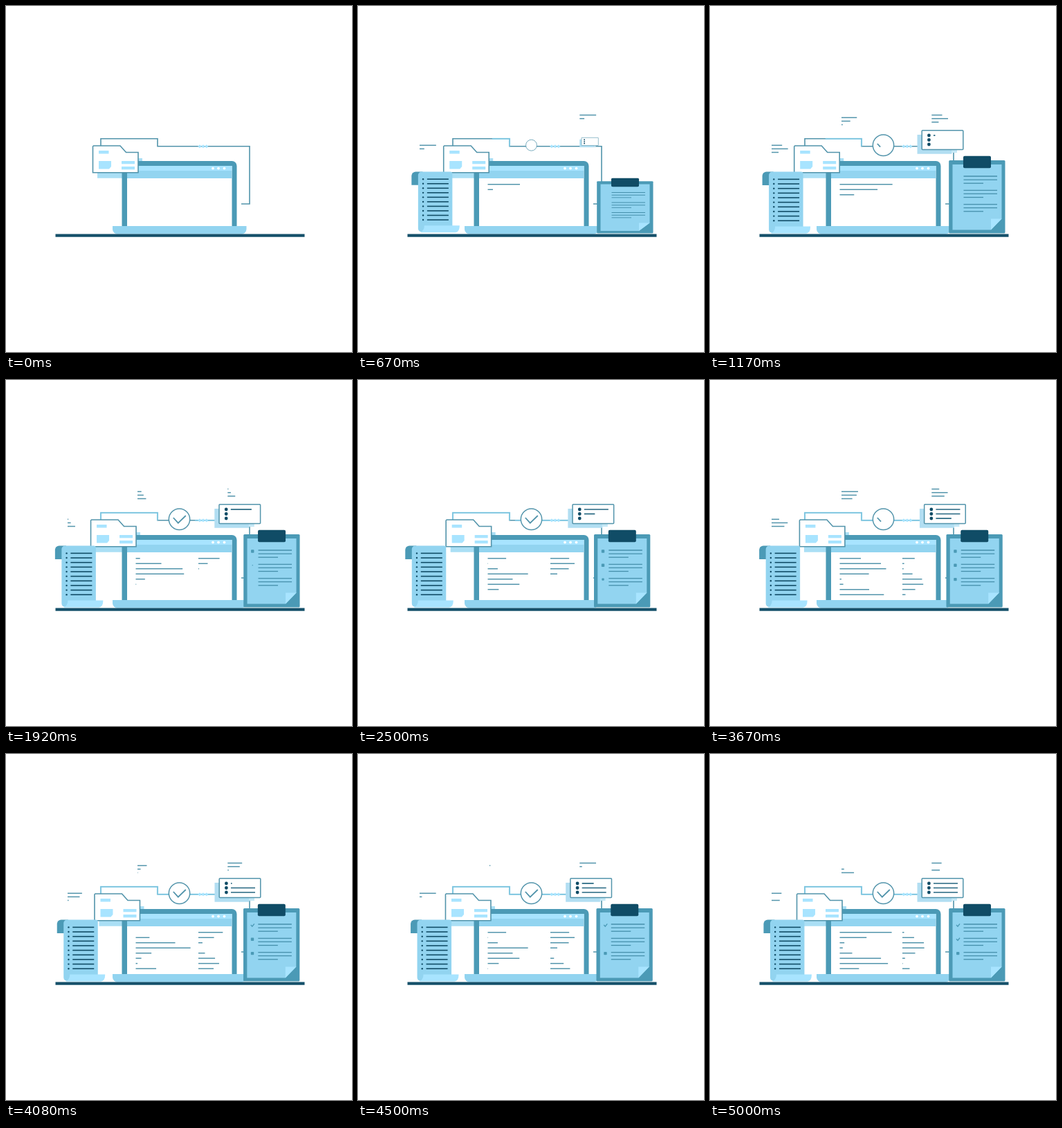
Write an HTML page with a canvas that moves like this. It is 500x500 px and loops after 5080 ms.

```html
<!DOCTYPE html>
<html lang="en">
<head>
<meta charset="utf-8">
<title>Documents workflow</title>
<style>
  html, body { margin: 0; width: 100%; height: 100%; overflow: hidden; background: #fff; }
  canvas { display: block; width: 500px; height: 500px; }
</style>
</head>
<body>
<canvas id="stage"></canvas>
<script>
const LOOP = 5080, STEP = 1000 / 12;
const STEEL = '#4b9ab6', NAVY = '#104c66', SKY = '#92d4f0', PALE = '#a8e4ff', EDGE = '#5294ab', GLOW = '#8ad3ee';

const canvas = document.getElementById('stage');
const ratio = window.devicePixelRatio || 1;
canvas.width = canvas.height = 500 * ratio;
const ctx = canvas.getContext('2d');

// Motion helpers, all times in seconds
const clamp = v => Math.min(1, Math.max(0, v));
const linear = (t, from, to) => clamp((t - from) / (to - from));
const wave = u => (1 - Math.cos(Math.PI * u)) / 2;
const ramp = (t, from, to) => wave(linear(t, from, to));
const bump = (t, from, peak, to) => ramp(t, from, peak) - ramp(t, peak, to);

// Drawing helpers
function rect(x, y, w, h, fill, radii = 0) {
  ctx.beginPath();
  ctx.roundRect(x, y, w, h, radii);
  ctx.fillStyle = fill;
  ctx.fill();
}

function trace(points) {
  ctx.beginPath();
  points.forEach(([x, y]) => ctx.lineTo(x, y));
}

function poly(points, fill) {
  trace(points);
  ctx.closePath();
  ctx.fillStyle = fill;
  ctx.fill();
}

function stroke(color, width) {
  ctx.strokeStyle = color;
  ctx.lineWidth = width;
  ctx.stroke();
}

// Strokes the first `len` pixels of a polyline
function partial(points, len, color, width) {
  if (len <= 0) return;
  ctx.setLineDash([len, 999]);
  trace(points);
  stroke(color, width);
  ctx.setLineDash([]);
}

function rule(x, y, w, color = EDGE, width = 1.5) {
  if (w < 0.4) return;
  trace([[x, y], [x + w, y]]);
  stroke(color, width);
}

function disc(x, y, r, fill) {
  ctx.beginPath();
  ctx.arc(x, y, r, 0, 2 * Math.PI);
  ctx.fillStyle = fill;
  ctx.fill();
}

// Draws a part shifted by dx and scaled about (ox, oy)
function placed(dx, ox, oy, sx, sy, draw) {
  if (sx < 0.01 || sy < 0.01) return;
  ctx.save();
  ctx.translate(ox + dx, oy);
  ctx.scale(sx, sy);
  ctx.translate(-ox, -oy);
  draw();
  ctx.restore();
}

const wire = [[340, 286], [352, 286], [352, 202.8], [219, 202.8], [219, 191.8], [137, 191.8], [137, 203]];

function drawWire(t) {
  trace(wire);
  stroke(EDGE, 1.6);
  ctx.globalAlpha = 0.75;
  partial(wire.slice(3), 103 * linear(t, 0, 1.9), GLOW, 2.2);
  partial([[312, 202.8], wire[3]], 93 * ramp(t, 1.2, 2.8), GLOW, 2.2);
  ctx.globalAlpha = 1;
  for (let x = 280; x < 292; x += 5) {
    poly([[x - 2.8, 202.8], [x, 200.2], [x + 2.2, 202.8], [x, 205.4]], PALE);
  }
}

// Each row starts a little later, then grows and shrinks every two seconds
function drawScreenText(t) {
  const row = (x, i, w, delay) => {
    if (t > delay) rule(x, 257.8 + 7.48 * i, w * wave(t - delay));
  };
  [77, 67, 70, 80, 36, 63, 77, 66].forEach((w, i) => {
    row(187.5, i, w, 0.1 + 0.35 * i);
    row(278, i, 36 - i, 1.17 + 0.32 * i);
  });
}

function drawLaptop(t) {
  rect(167.5, 224, 166, 95, STEEL, [7, 7, 0, 0]);
  rect(175, 231, 151.5, 88, '#fff');
  rect(175, 231, 151.5, 7, PALE);
  rect(175, 238, 151.5, 11, SKY);
  [299, 307, 315.5].forEach(x => disc(x, 234.6, 1.9, '#fff'));
  drawScreenText(t);
  rect(154, 318, 193.5, 11.5, SKY, [0, 0, 7, 7]);
}

function drawFolder() {
  poly([[125.5, 203], [126.5, 202], [165, 202], [173.5, 211.5], [191, 211.5], [191, 240.8], [125.5, 240.8]], '#fff');
  stroke(EDGE, 1.6);
  rect(134, 209, 14.5, 4.5, PALE);
  poly([[134, 224], [152, 224], [152, 232], [149, 235.5], [134, 235.5]], PALE);
  rect(167, 224, 19, 4.3, PALE);
  rect(167, 232, 19, 4.3, PALE);
}

function drawScroll() {
  rect(77.5, 239.5, 16, 19.5, STEEL, [6, 0, 0, 0]);
  rect(87, 239.5, 49.5, 88.5, SKY, [5, 3, 0, 5]);
  ctx.beginPath();
  ctx.moveTo(96, 318.5);
  ctx.lineTo(147, 318.5);
  ctx.quadraticCurveTo(147, 328, 141, 328.7);
  ctx.lineTo(90, 328.7);
  ctx.quadraticCurveTo(96, 326, 96, 318.5);
  ctx.fillStyle = PALE;
  ctx.fill();
  for (let i = 0; i < 10; i++) {
    const y = 250.4 + 6.65 * i;
    disc(94.2, y, 1.2, NAVY);
    rule(100, y, 31, NAVY, 1.6);
  }
}

function drawBadge(t) {
  disc(250.5, 201.2, 15.2, '#fff');
  stroke(EDGE, 1.5);
  const drawn = bump(t, 0.95, 1.6, 3.1) + ramp(t, 3.5, 3.95);
  const check = t < 3.1 ? ramp(t, 0.95, 1.6) : ramp(t, 3.5, 3.95);
  if (drawn > 0) partial([[241.8, 199], [248.8, 206.6], [259.8, 196]], 25.6 * check, EDGE, 1.8);
}

function drawCard(t) {
  rect(299.5, 186, 50, 27.8, '#b2def2');
  rect(349, 206, 8, 6, '#c5e8f6');
  rect(306.2, 179.8, 59.6, 27.6, '#fff', 1);
  stroke(EDGE, 1.5);
  for (let i = 0; i < 3; i++) {
    // Rows are typed in turn, each one again after all three are done
    const y = 187 + 6.5 * i, since = t - 1.1 - 0.98 * i;
    disc(316.4, y, 2.4, NAVY);
    rule(323, y, 35 * clamp(since % 2.94 / 0.95), '#23657f', 1.7);
  }
}

function drawClipboard(t) {
  rect(345.2, 223, 81.3, 105.5, STEEL, 1.5);
  poly([[350.5, 229], [421.5, 229], [421.5, 307.5], [406, 323.5], [350.5, 323.5]], SKY);
  poly([[406, 307.5], [421.5, 307.5], [406, 323.5]], PALE);
  rect(366, 216.8, 40, 17.4, NAVY, 2);
  for (let g = 0; g < 3; g++) {
    const y = 246 + 20.3 * g, bulletAt = 1.3 + 0.5 * g, checkAt = 3.8 + 0.7 * g;
    [48.5, 48.5, 28.5].forEach((w, i) => rule(366.5, y + 5.1 * i, w, '#458fab', 1.3));
    const size = 4.4 * ramp(t, bulletAt, bulletAt + 0.3);
    if (t < checkAt) rect(358.2 - size / 2, y + 1.5 - size / 2, size, size, STEEL, 0.8);
    else partial([[356, y + 1], [358, y + 3.2], [361, y - 0.6]], 8 * ramp(t, checkAt, checkAt + 0.3), STEEL, 1.4);
  }
}

// Three short lines swinging at different rates, mirrored in time around 2.5 s
function drawCaption(t, x, y, start, rate, spread) {
  for (let i = 0; i < 3; i++) {
    const swing = wave((t - 2.5) * (rate + spread * i) / 3.8) ** 2;
    const begin = start + 0.2 * i;
    rule(x, y + 5.1 * i, 24 * swing * ramp(t, begin, begin + 0.5));
  }
}

function draw(t) {
  ctx.setTransform(ratio, 0, 0, ratio, 0, 0);
  ctx.fillStyle = '#fff';
  ctx.fillRect(0, 0, 500, 500);

  const folderX = -4.3 * bump(t, 0, 1.5, 3.15) + 4.7 * bump(t, 1.5, 3.15, 5.08);
  const scrollX = -9.5 * bump(t, 0.5, 2.75, 5.1);
  const drift = bump(t, 1.1, 3, 5);
  const badge = bump(t, 0.45, 0.87, 3.1) && ramp(t, 0.45, 0.87) - ramp(t, 2.8, 3.1) + ramp(t, 3.2, 3.6);
  const badgeScale = t < 3.1 ? badge : ramp(t, 3.2, 3.6);
  const card = ramp(t, 0.3, 1.13);

  drawCaption(t, 89, 201.3, 0.1, 2, 1);
  drawCaption(t, 190, 161.3, 0.6, 3.2, 0.5);
  drawCaption(t, 320.3, 157.6, 0.1, 2, 1);
  drawWire(t);
  rect(132 + folderX, 220, 65, 28.7, '#aadff5');
  drawLaptop(t);
  placed(folderX, 0, 0, 1, 1, drawFolder);
  placed(scrollX, 112, 239.5, 1, ramp(t, 0.08, 0.72), drawScroll);
  placed(0, 250.5, 201.2, badgeScale, badgeScale, () => drawBadge(t));
  placed(4.6 * drift, 334.5, 197.5, card, card, () => drawCard(t));
  placed(-5 * drift, 386, 328.5, 1, ramp(t, 0.25, 0.9), () => drawClipboard(t));
  rect(71.5, 329.5, 360, 4.2, '#15506a');
}

const start = performance.now();
function tick() {
  const ms = (performance.now() - start) % LOOP;
  draw(Math.floor((ms + 3.4) / STEP) * STEP / 1000);
  requestAnimationFrame(tick);
}
tick();
</script>
</body>
</html>
```
